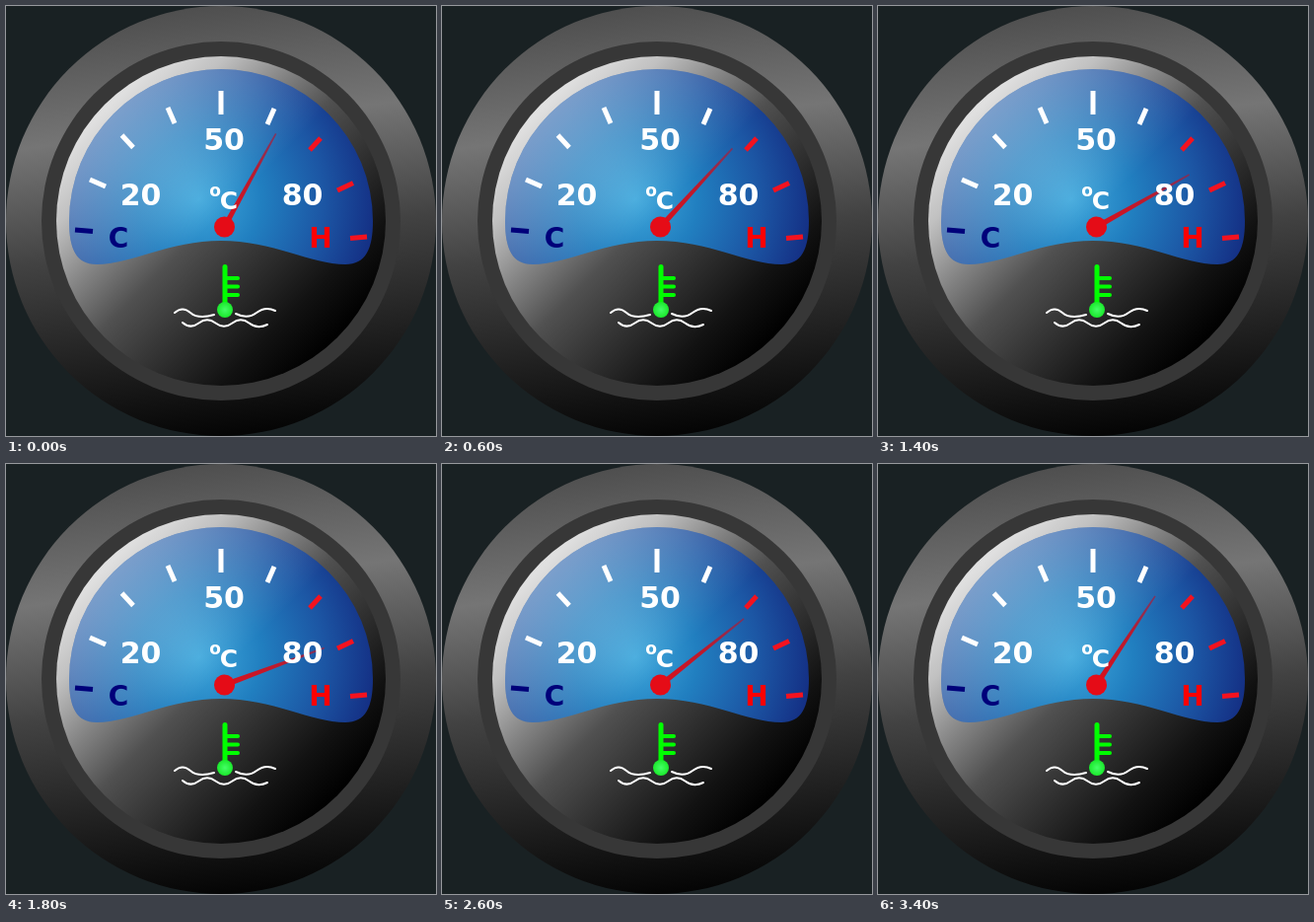
An HTML page for the animation above (3600 ms loop, 436x436 px).

```html
<!DOCTYPE html>
<html lang="en">
<head>
<meta charset="utf-8">
<title>Temperature gauge</title>
<style>
  html, body { margin: 0; height: 100%; overflow: hidden; background: #192123; }
  svg { display: block; width: 436px; height: 436px; }
  text { font: bold 30px "DejaVu Sans", sans-serif; text-anchor: middle; fill: #fff; }
</style>
</head>
<body>
<svg viewBox="0 0 436 436">
  <defs>
    <linearGradient id="bezel" gradientUnits="userSpaceOnUse" x1="190" y1="0" x2="245" y2="432">
      <stop offset="0" stop-color="#4e4e4e"/>
      <stop offset=".28" stop-color="#757575"/>
      <stop offset=".55" stop-color="#424242"/>
      <stop offset="1" stop-color="#050505"/>
    </linearGradient>
    <linearGradient id="face" gradientUnits="userSpaceOnUse" x1="100" y1="100" x2="336" y2="336">
      <stop offset="0" stop-color="#e2e2e2"/>
      <stop offset=".16" stop-color="#c0c0c0"/>
      <stop offset=".32" stop-color="#858585"/>
      <stop offset=".48" stop-color="#505050"/>
      <stop offset=".62" stop-color="#383838"/>
      <stop offset=".85" stop-color="#121212"/>
      <stop offset="1" stop-color="#000"/>
    </linearGradient>
    <radialGradient id="dial" gradientUnits="userSpaceOnUse" cx="196" cy="196" r="180">
      <stop offset="0" stop-color="#3fa8dc"/>
      <stop offset=".35" stop-color="#217fc0"/>
      <stop offset=".7" stop-color="#1c56a4"/>
      <stop offset="1" stop-color="#142f84"/>
    </radialGradient>
    <linearGradient id="gloss" gradientUnits="userSpaceOnUse" x1="90" y1="90" x2="215" y2="215">
      <stop offset="0" stop-color="#fff" stop-opacity=".5"/>
      <stop offset="1" stop-color="#fff" stop-opacity="0"/>
    </linearGradient>
    <linearGradient id="red" gradientUnits="userSpaceOnUse" x1="0" y1="0" x2="0" y2="-108">
      <stop offset="0" stop-color="#d8101c"/>
      <stop offset=".6" stop-color="#b81c30"/>
      <stop offset="1" stop-color="#a02040" stop-opacity=".7"/>
    </linearGradient>
    <radialGradient id="bulb">
      <stop offset="0" stop-color="#4f6"/>
      <stop offset="1" stop-color="#1be82c"/>
    </radialGradient>
    <path id="panel" d="M64 218A154 154 0 0 1 372 218C372 246 365 262 344 262C310 262 270 238 218 238S126 262 92 262C71 262 64 246 64 218Z"/>
  </defs>

  <circle cx="218" cy="218" r="218" fill="url(#bezel)"/>
  <circle cx="218" cy="218" r="182" fill="#373737"/>
  <circle cx="218" cy="218" r="167" fill="url(#face)"/>
  <use href="#panel" fill="url(#dial)"/>
  <use href="#panel" fill="url(#gloss)"/>

  <g stroke-width="5">
    <path stroke="#fff" d="M218 86V110M272 104L265 120M164 103L171 119M117.500 131L129 143.500M85 176L101 183"/>
    <path stroke="#00007a" d="M70 227L88 228.500"/>
    <path stroke="#f4121f" d="M319 134L308 146M352 179.500L336 187M366 234L349 235.500"/>
  </g>

  <path id="needle" fill="url(#red)" d="M-2.800 0L-.8 -108H.8L2.800 0Z"/>
  <circle cx="221.500" cy="224" r="10.500" fill="#e50c17"/>

  <text x="221" y="146">50</text>
  <text x="136.500" y="202">20</text>
  <text x="300.500" y="202">80</text>
  <text x="212" y="193" style="font-size:17px">o</text>
  <text x="226" y="206" style="font-size:25px">C</text>
  <text x="114" y="245" style="font-size:28px;fill:#00007a">C</text>
  <text x="319" y="245" style="font-size:28px;fill:#f00">H</text>

  <path fill="none" stroke="#fff" stroke-width="2" stroke-linecap="round"
    d="M171 311Q179 304 187 311T211 313M233 312Q245 318 254 311T273 309M179 321Q187 328 195.500 321.500T212.500 321.500T229.500 321.500T246.500 321.500T265 323"/>
  <g stroke="#0f0" stroke-linecap="round">
    <path stroke-width="5" d="M222 264.500V305"/>
    <path stroke-width="4" d="M222 276H235M222 284.500H235M222 293H235"/>
  </g>
  <circle cx="222" cy="308" r="8" fill="url(#bulb)"/>
</svg>
<script>
  const needle = document.getElementById("needle");
  const STEP = 200, STEPS = 18;

  // The needle climbs for half the loop in equal steps, then falls back.
  function draw() {
    const step = Math.floor(performance.now() / STEP) % STEPS;
    const angle = 28.9 + 4.53 * Math.min(step, STEPS - step);
    needle.setAttribute("transform", `translate(221.500 224) rotate(${angle})`);
    requestAnimationFrame(draw);
  }
  draw();
</script>
</body>
</html>
```
